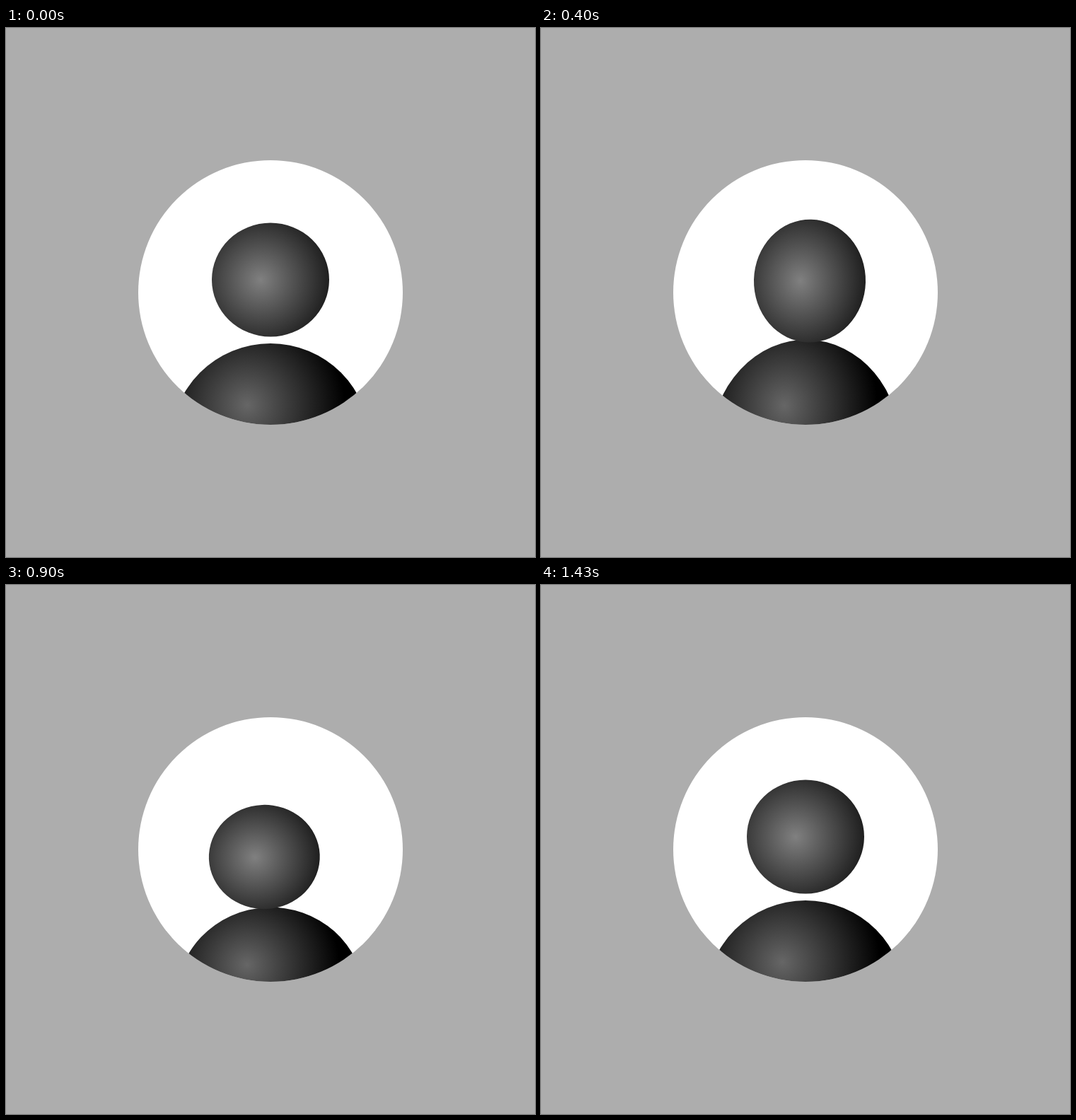
An HTML page for the animation above (1500 ms loop, 748x748 px).

```html
<!DOCTYPE html>
<html lang="en">
<head>
<meta charset="utf-8">
<title>Jumping avatar</title>
<style>
  html, body { margin: 0; width: 100%; height: 100%; overflow: hidden; background: #adadad; }
  svg { display: block; width: 100vw; height: 100vh; }
</style>
</head>
<body>
<svg viewBox="0 0 748 748">
  <defs>
    <clipPath id="disc"><circle cx="374" cy="374" r="187"/></clipPath>
    <radialGradient id="headFill" gradientUnits="userSpaceOnUse" cx="-14" cy="0" r="128">
      <stop stop-color="#808080"/><stop offset="1"/>
    </radialGradient>
    <radialGradient id="bodyFill" gradientUnits="userSpaceOnUse" cx="-33" cy="-54" r="138">
      <stop stop-color="#666"/><stop offset="1"/>
    </radialGradient>
  </defs>
  <circle cx="374" cy="374" r="187" fill="#fff"/>
  <g clip-path="url(#disc)">
    <g id="figure">
      <circle r="141" fill="url(#bodyFill)"/>
      <ellipse id="head" rx="83" ry="80.5" fill="url(#headFill)"/>
    </g>
  </g>
</svg>
<script>
const LOOP = 1500, FPS = 30;
const figure = document.getElementById('figure');
const head = document.getElementById('head');

// step, body y, tilt in degrees, x scale, y scale, head height above body
const poses = [
  [0, 587, 0, 1, 1, 231],
  [5, 594.5, 3.04, 1, .93, 223],
  [6.6, 596, 3.3, 1, .905, 220],
  [12, 593, 1.46, .952, 1.08, 218],
  [15.4, 590, -.8, .925, 1.13, 256],
  [18, 588, -2.52, .92, 1.1, 242],
  [22, 586.5, -4.4, .92, .925, 231],
  [24, 586, -4.7, .92, .88, 222],
  [32, 583.5, 2.3, 1, .994, 217],
  [43, 587, 0, 1, 1, 231]
];

const slope = (i, c) => (poses[i + 1][c] - poses[i][c]) / (poses[i + 1][0] - poses[i][0]);

// Monotone tangent: flat at turning points, harmonic mean elsewhere
function tangent(i, c) {
  if (i === 0 || i === poses.length - 1) return 0;
  const a = slope(i - 1, c), b = slope(i, c);
  return a * b > 0 ? 2 * a * b / (a + b) : 0;
}

function sample(step, c) {
  const i = Math.max(0, poses.findIndex(p => p[0] >= step) - 1);
  const p = poses[i], q = poses[i + 1];
  const span = q[0] - p[0], u = (step - p[0]) / span, v = 1 - u;
  return v * v * (1 + 2 * u) * p[c] + u * u * (3 - 2 * u) * q[c]
    + span * u * v * (v * tangent(i, c) - u * tangent(i + 1, c));
}

function draw(now) {
  const t = Math.floor(now % LOOP / 10) * 10;
  const step = Math.min(43, Math.floor((t + 9) * FPS / 1000));
  const [y, tilt, sx, sy, height] = [1, 2, 3, 4, 5].map(c => sample(step, c));
  figure.setAttribute('transform', `translate(374 ${y}) rotate(${tilt}) scale(${sx} ${sy})`);
  head.setAttribute('transform', `translate(0 ${-height})`);
}

const start = performance.now();
function tick() {
  draw(performance.now() - start);
  requestAnimationFrame(tick);
}
tick();
</script>
</body>
</html>
```
